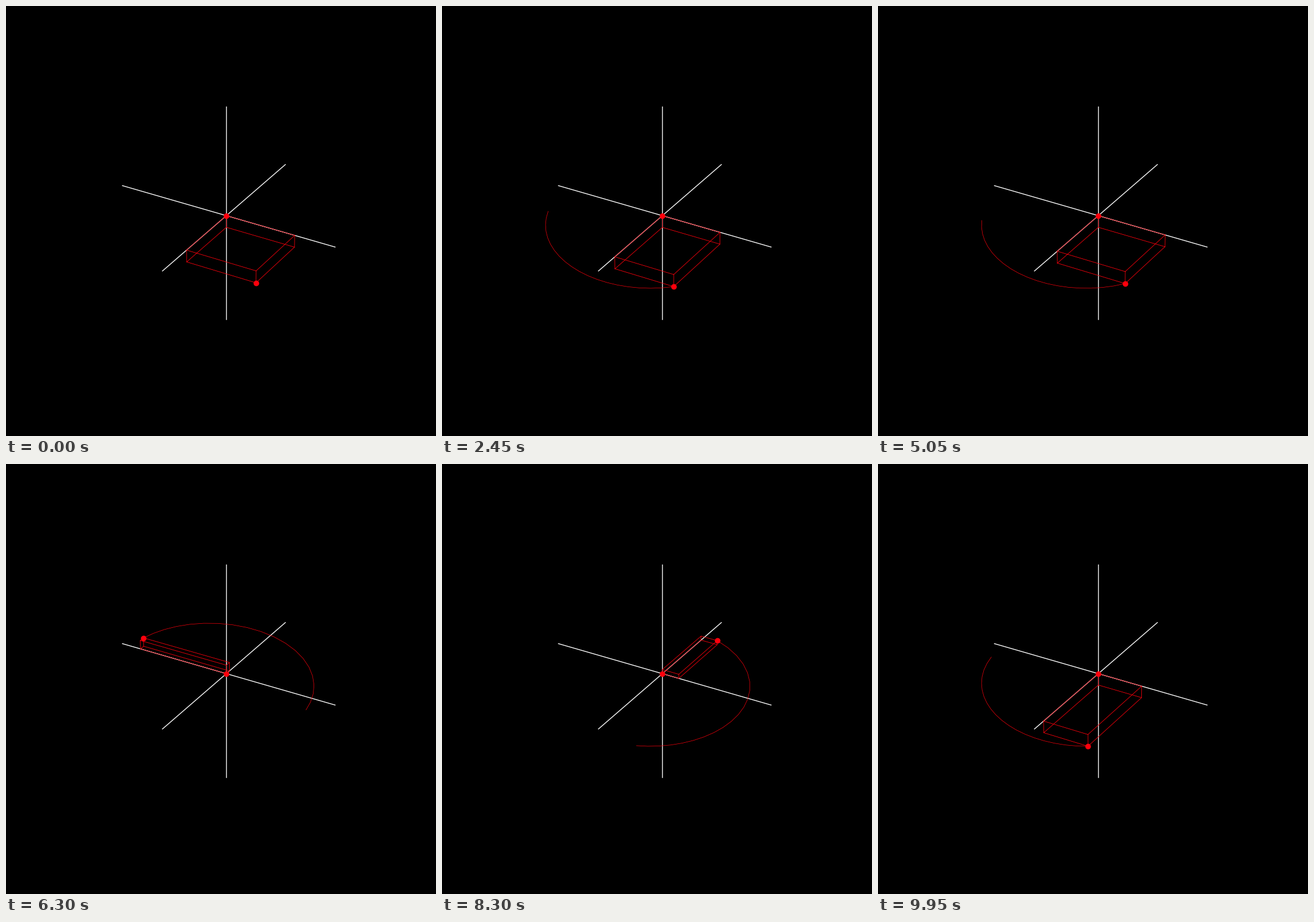
Recreate the animation shown at these times as a matplotlib script. Size 748 by 748 pixels, loop 10000 ms.

```python
import itertools
import math

import matplotlib.pyplot as plt
import numpy as np
from matplotlib.animation import FuncAnimation

SIZE, DPI = 748, 100
FRAMES, INTERVAL = 200, 50
RED = "#ff000c"

# Camera
ELEV, AZIM, DIST = math.radians(30), math.radians(-60), 10
HALF = 0.5281  # half length of the coordinate axes

# Orbit: size relative to HALF, angles in radians
SEMI_MAJOR, ECC = 0.8378 * HALF, 0.2056
INCL, NODE, PERI = (math.radians(a) for a in (7.0, 48.33, 29.13))
MEAN_START, MEAN_STEP = math.radians(259.2), math.radians(7.1105)
TRAIL = 20


def project(points):
    """Perspective view of 3D points as screen x and y."""
    x, y, z = np.asarray(points, float).T
    right = -math.sin(AZIM) * x + math.cos(AZIM) * y
    ahead = math.cos(AZIM) * x + math.sin(AZIM) * y
    up = math.cos(ELEV) * z - math.sin(ELEV) * ahead
    depth = DIST - math.cos(ELEV) * ahead - math.sin(ELEV) * z
    return right / depth, up / depth


def orbit(step):
    """Position on the Kepler ellipse for one or more time steps."""
    mean = MEAN_START + MEAN_STEP * np.asarray(step, float)
    ecc_anom = mean.copy()
    for _ in range(8):
        ecc_anom = ecc_anom - (ecc_anom - ECC * np.sin(ecc_anom) - mean) / (
            1 - ECC * np.cos(ecc_anom))
    u = SEMI_MAJOR * (np.cos(ecc_anom) - ECC)
    v = SEMI_MAJOR * math.sqrt(1 - ECC ** 2) * np.sin(ecc_anom)
    along = u * math.cos(PERI) - v * math.sin(PERI)
    across = u * math.sin(PERI) + v * math.cos(PERI)
    flat = across * math.cos(INCL)
    return np.stack([along * math.cos(NODE) - flat * math.sin(NODE),
                     along * math.sin(NODE) + flat * math.cos(NODE),
                     across * math.sin(INCL)], axis=-1)


fig = plt.figure(figsize=(SIZE / DPI, SIZE / DPI), dpi=DPI, facecolor="black")
ax = fig.add_axes([0, 0, 1, 1])
ax.axis("off")

for direction in np.eye(3) * HALF:
    ax.plot(*project([-direction, direction]), color="white", lw=1)

corners = np.array(list(itertools.product((0, 1), repeat=3)))
edges = [(a, b) for a, b in itertools.combinations(corners, 2)
         if abs(a - b).sum() == 1]
box = [ax.plot([], [], color=RED, lw=0.6)[0] for _ in edges]
trail, = ax.plot([], [], color=RED, lw=0.5)
ax.scatter([0], [0], s=36, color=RED, zorder=4)
planet = ax.scatter([0], [0], s=36, color=RED, zorder=5)

ax.set_xlim(-0.0948, 0.0902)
ax.set_ylim(-0.0948, 0.0902)


def update(frame):
    pos = orbit(frame)
    for line, edge in zip(box, edges):
        line.set_data(*project(np.array(edge) * pos))
    steps = np.arange(max(0, frame - TRAIL + 1), frame + 1)
    trail.set_data(*project(orbit(steps)))
    planet.set_offsets(np.column_stack(project([pos])))
    return [*box, trail, planet]


anim = FuncAnimation(fig, update, frames=FRAMES, interval=INTERVAL,
                     init_func=lambda: update(0), repeat=True, repeat_delay=0)
plt.show()
```
